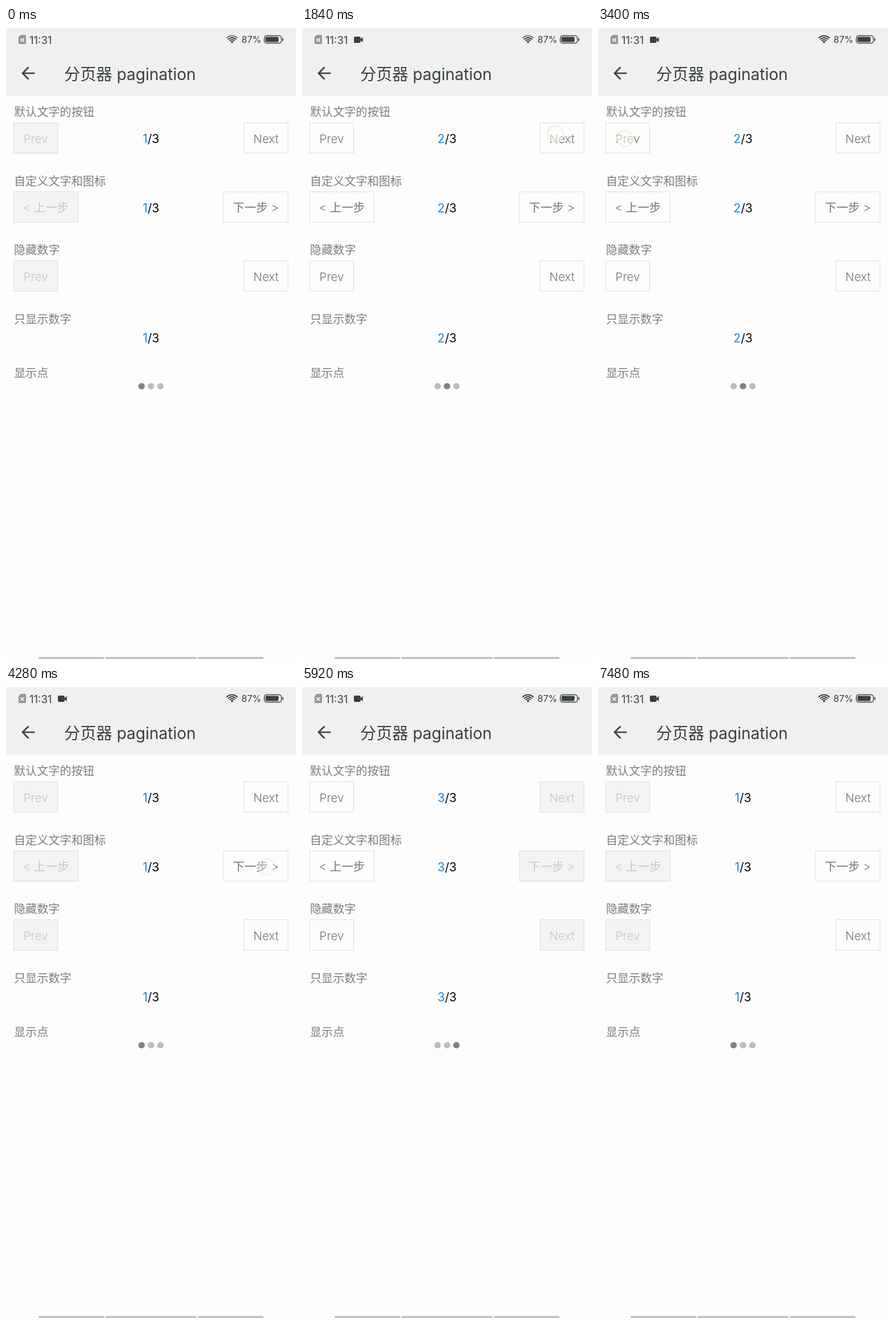
Animation of 508x1102 px, one loop 7520 ms. Source, as an HTML page with a canvas:

```html
<!DOCTYPE html>
<html lang="zh-CN">
<head>
<meta charset="utf-8">
<title>Pagination</title>
<style>
  html, body { margin: 0; width: 100%; height: 100%; overflow: hidden; background: #fcfdfc; }
  canvas { display: block; width: 508px; height: 1102px; }
</style>
</head>
<body>
<canvas id="stage" width="508" height="1102"></canvas>
<script>
const ctx = document.getElementById('stage').getContext('2d');
const LOOP = 7520;
const FAMILY = 'Inter, "Noto Sans CJK SC", "Noto Sans CJK", sans-serif';
const INK = '#3c403c';
const PAGE_BG = '#fcfdfc';

// Each tap shows a ring; the page turns shortly after the finger lands.
const TAP_LENGTH = 200, TURN_DELAY = 120;
const taps = [
  { at: 1120, x: 444, y: 185, step: 1 },
  { at: 1800, x: 444, y: 185, step: 1 },
  { at: 2920, x: 47, y: 193, step: -1 },
  { at: 3360, x: 47, y: 193, step: -1 },
  { at: 4280, x: 457, y: 314, step: 1 },
  { at: 4880, x: 457, y: 314, step: 1 },
  { at: 6160, x: 89, y: 316, step: -1 },
  { at: 6480, x: 89, y: 316, step: -1 }
];

const clamp = v => Math.max(0, Math.min(1, v));

function text(str, x, y, size, color, weight = 400, align = 'left') {
  ctx.font = `${weight} ${size}px ${FAMILY}`;
  ctx.textAlign = align;
  ctx.fillStyle = color;
  ctx.fillText(str, x, y);
}

function rect(x, y, w, h, color, radius = 0) {
  ctx.fillStyle = color;
  ctx.beginPath();
  ctx.roundRect(x, y, w, h, radius);
  ctx.fill();
}

function disc(x, y, r, color) {
  ctx.fillStyle = color;
  ctx.beginPath();
  ctx.arc(x, y, r, 0, Math.PI * 2);
  ctx.fill();
}

function polygon(points, color) {
  ctx.fillStyle = color;
  ctx.beginPath();
  points.forEach(p => ctx.lineTo(...p));
  ctx.fill();
}

function strokePath(d, color, width, cap = 'butt') {
  ctx.strokeStyle = color;
  ctx.lineWidth = width;
  ctx.lineCap = cap;
  ctx.stroke(new Path2D(d));
}

function drawSim() {
  polygon([[26, 12], [35, 12], [35, 28], [22, 28], [22, 16]], '#969996');
  strokePath('M25.5 18L31.5 24M31.5 18L25.5 24', '#fff', 1.7);
}

function drawCamera(grow) {
  if (!grow) return;
  ctx.save();
  ctx.globalAlpha = grow;
  ctx.translate(98.5, 20.5);
  ctx.scale(grow, grow);
  rect(-7.5, -5.5, 11.5, 11, INK, 1.5);
  polygon([[3.5, -1], [8, -4.5], [8, 4.5], [3.5, 1]], INK);
  ctx.restore();
}

function drawWifi(strong) {
  const x = 396, y = 26;
  disc(x, y - 1.5, 1.9, INK);
  [5.5, 9, 12.6].forEach((r, i) => {
    ctx.strokeStyle = i === 2 && !strong ? '#727672' : INK;
    ctx.lineWidth = 2;
    ctx.lineCap = 'butt';
    ctx.beginPath();
    ctx.arc(x, y, r, -Math.PI * 0.78, -Math.PI * 0.22);
    ctx.stroke();
  });
}

function drawBattery() {
  ctx.strokeStyle = INK;
  ctx.lineWidth = 1.5;
  ctx.beginPath();
  ctx.roundRect(452.5, 13.5, 30, 13, 4);
  ctx.stroke();
  rect(454.5, 15.5, 23, 9, INK, 2);
  rect(484, 17.5, 1.8, 5, INK, 1);
}

function drawHeader(t) {
  rect(0, 0, 508, 118.5, '#eef1ee');
  drawSim();
  text('11:31', 41, 27.5, 18.5, INK);
  drawCamera(clamp((t - 40) / 320));
  drawWifi(t >= 2680);
  text('87%', 412.5, 26.3, 16, INK);
  drawBattery();
  strokePath('M50.5 79H30M39.5 68.5L29 79L39.5 89.5', INK, 2.7);
  text('分页器 pagination', 102, 90.5, 28, INK);
}

function drawButton(label, x, y, w, enabled) {
  rect(x, y, w, 54, enabled ? PAGE_BG : '#f2f4f1');
  ctx.strokeStyle = '#d9dee2';
  ctx.lineWidth = 1;
  ctx.strokeRect(x + 0.5, y + 0.5, w - 1, 53);
  text(label, x + w / 2, y + 35.5, 20.5, enabled ? '#727572' : '#c4c8c4', 300, 'center');
}

function drawButtons(prev, next, y, width, page) {
  drawButton(prev, 13, y, width, page > 1);
  drawButton(next, 494.5 - width, y, width, page < 3);
}

function drawCount(page, y) {
  ctx.font = `400 21px ${FAMILY}`;
  const pageWidth = ctx.measureText(page).width;
  const left = 254 - (pageWidth + ctx.measureText('/3').width) / 2;
  text(page, left, y, 21, '#1b88de');
  text('/3', left + pageWidth, y, 21, '#080808');
}

function drawRing({ at, x, y }, t) {
  const age = t - at;
  if (age < 0 || age >= TAP_LENGTH) return;
  ctx.save();
  ctx.globalAlpha = Math.min(clamp(0.5 + age / 120), clamp((TAP_LENGTH + 40 - age) / 80));
  disc(x, y, 14, 'rgba(253,253,250,0.65)');
  ctx.strokeStyle = '#f6e6c8';
  ctx.lineWidth = 2;
  ctx.beginPath();
  ctx.arc(x, y, 14, 0, Math.PI * 2);
  ctx.stroke();
  ctx.restore();
}

function draw(t) {
  const page = taps.reduce((p, tap) => t >= tap.at + TURN_DELAY ? p + tap.step : p, 1);
  rect(0, 0, 508, 1102, PAGE_BG);
  drawHeader(t);

  const headings = [['默认文字的按钮', 146], ['自定义文字和图标', 267], ['隐藏数字', 387], ['只显示数字', 508], ['显示点', 602]];
  headings.forEach(([label, y]) => text(label, 14, y + 7.5, 20.1, '#7b7e7b', 300));

  drawButtons('Prev', 'Next', 165, 78, page);
  drawButtons('< 上一步', '下一步 >', 285.5, 114, page);
  drawButtons('Prev', 'Next', 406, 78, page);
  [201.3, 321.8, 549.3].forEach(y => drawCount(page, y));
  [1, 2, 3].forEach(i => disc(221 + i * 16.5, 625.5, 5.6, i === page ? '#7e8088' : '#b9bcc4'));

  [[57, 115], [174, 160], [336, 115]].forEach(([x, w]) => rect(x, 1098.5, w, 3.5, '#bfc3be', 1.5));
  taps.forEach(tap => drawRing(tap, t));
}

const start = performance.now();
function tick(now) {
  draw(Math.max(0, now - start) % LOOP);
  requestAnimationFrame(tick);
}
draw(0);
requestAnimationFrame(tick);
</script>
</body>
</html>
```
